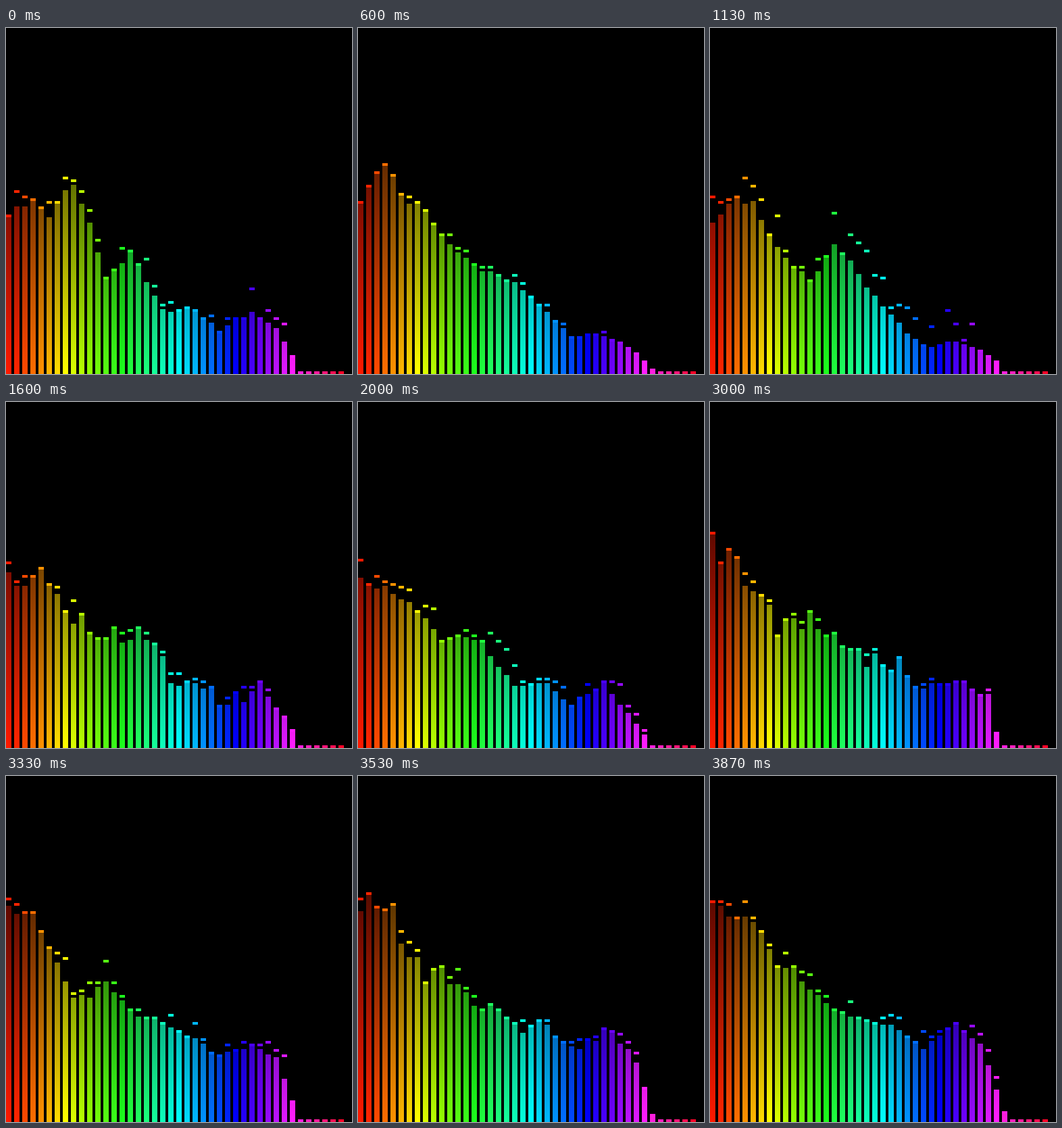
Write an HTML page with a canvas that moves like this. It is 512x512 px and loops after 3940 ms.

```html
<!DOCTYPE html>
<html lang="en">
<head>
<meta charset="utf-8">
<title>Spectrum</title>
<style>
  html, body { margin: 0; width: 100%; height: 100%; overflow: hidden; background: #000; }
  canvas { display: block; width: 512px; height: 512px; }
</style>
</head>
<body>
<canvas id="stage" width="512" height="512"></canvas>
<script>
const SIZE = 512, UNIT = 4, PITCH = 12, BAR = 8, COLS = 42;
const LOOP = 3940;
const ctx = document.getElementById('stage').getContext('2d');
const columns = Array.from({ length: COLS }, (_, c) => c);

const mix = (a, b, u) => a + (b - a) * u;
const random = seed => {
  const x = Math.sin(seed) * 43758.5453;
  return x - Math.floor(x);
};

// Columns where the outline of the spectrum bends
const KNOTS = [0, 3, 5, 8, 10, 12, 15, 19, 23, 26, 30, 33, 36];

function outline(heights, c) {
  const i = KNOTS.findIndex(k => k >= c);
  if (i < 0) return 1;
  if (KNOTS[i] === c) return heights[i];
  return mix(heights[i - 1], heights[i], (c - KNOTS[i - 1]) / (KNOTS[i] - KNOTS[i - 1]));
}

// lift: mean distance of the peak markers above their bars, in units
function pose(step, lift, heights) {
  const bars = columns.map(c => outline(heights, c));
  const peaks = bars.map((h, c) => {
    const chance = random(c * 12.99 + step * 78.23);
    return h + 3 * lift * chance * chance * Math.min(1, (h - 1) / 10);
  });
  return { step, bars, peaks };
}

const poses = [
  pose(0, 3, [59, 64, 60, 70, 55, 36, 45, 24, 24, 16, 23, 17, 1]),
  pose(9, 1.2, [64, 78, 67, 60, 51, 46, 38, 34, 23, 14, 14, 10, 2]),
  pose(17, 4.6, [57, 64, 64, 46, 39, 35, 48, 33, 18, 10, 12, 9, 1]),
  pose(30, 3.5, [61, 60, 55, 48, 40, 41, 39, 23, 24, 16, 24, 13, 1]),
  pose(40, 2, [44, 50, 51, 30, 39, 30, 31, 27, 18, 15, 11, 3, 1]),
  pose(50, 4.2, [80, 77, 64, 47, 47, 51, 42, 36, 31, 24, 29, 23, 1]),
  pose(58, 2.6, [82, 76, 74, 58, 58, 48, 42, 37, 35, 27, 37, 29, 4]),
];

// Greens and magentas are slightly paler than the other hues.
const colours = columns.map(c => {
  const hue = Math.max(6, c * 60 / 7);
  const pale = Math.max(0, Math.cos((hue - 130) * Math.PI / 90));
  return `hsl(${hue} 100% ${50 + 6 * pale}%)`;
});
const fills = colours.map(colour => {
  const g = ctx.createLinearGradient(0, 0, 0, SIZE);
  g.addColorStop(0, '#000');
  g.addColorStop(1, colour);
  return g;
});

// Each bar swings up to its next peak, then settles below it.
function level(a, b, c, step) {
  const u = (step - a.step) / (b.step - a.step);
  const crest = 0.6 + 0.25 * (c * 0.618 % 1);
  const rise = Math.min(1, u / crest);
  const base = u < crest
    ? mix(a.bars[c], b.peaks[c], rise)
    : mix(b.peaks[c], b.bars[c], (u - crest) / (1 - crest));
  const wobble = Math.sin(step * 1.3 + c * 2.1) + Math.sin(step * 0.7 + c * 0.9);
  const amount = 0.015 + 0.035 * Math.sin(Math.PI * u);
  const bar = Math.max(1, Math.round(base * (1 + amount * wobble)));
  const peak = Math.max(bar, Math.round(mix(a.peaks[c], b.peaks[c], rise)));
  return { bar, peak };
}

function draw(step) {
  const next = Math.max(1, poses.findIndex(p => p.step >= step));
  ctx.fillStyle = '#000';
  ctx.fillRect(0, 0, SIZE, SIZE);
  for (const c of columns) {
    const { bar, peak } = level(poses[next - 1], poses[next], c, step);
    ctx.fillStyle = fills[c];
    ctx.fillRect(c * PITCH, SIZE - bar * UNIT, BAR, bar * UNIT);
    ctx.fillStyle = colours[c];
    ctx.fillRect(c * PITCH, SIZE - peak * UNIT, BAR, UNIT);
  }
}

// 15 steps a second, on a clock that ticks every 10 ms
function stepAt(ms) {
  return Math.floor((Math.floor(ms / 10) * 10 + 5) * 0.015);
}

const start = performance.now();
function tick() {
  draw(stepAt((performance.now() - start) % LOOP));
  requestAnimationFrame(tick);
}
tick();
</script>
</body>
</html>
```
